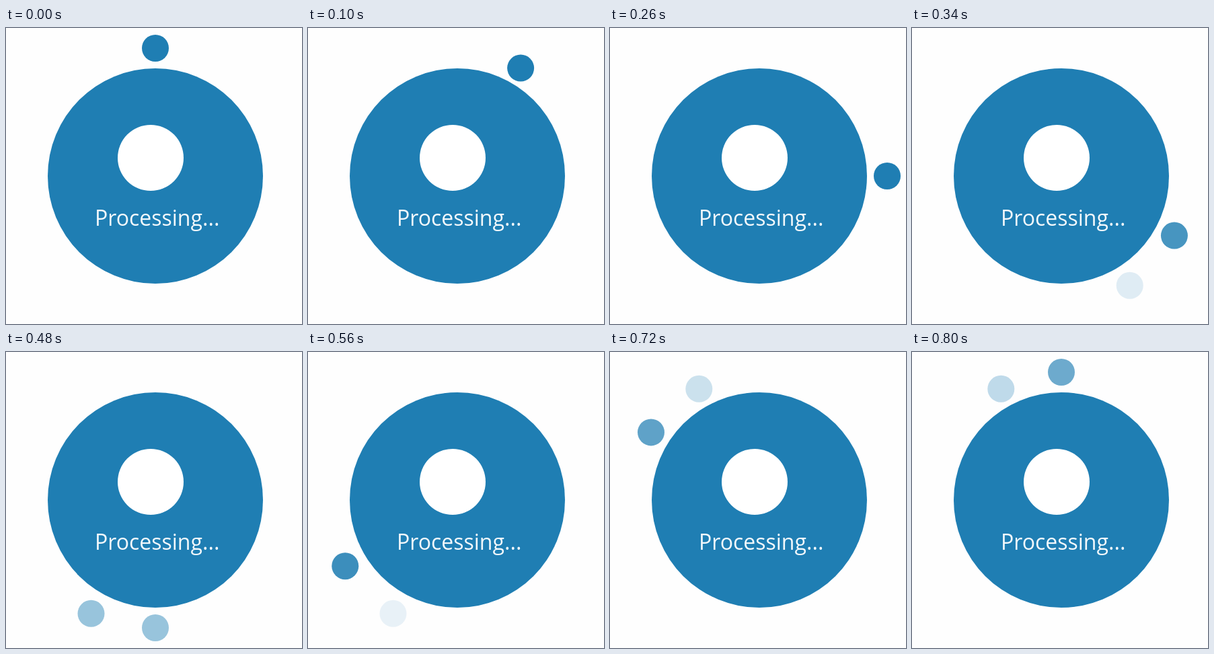
An HTML page for the animation above (0.82 s loop, 440 px wide and 440 px high).

```html
<!DOCTYPE html>
<html lang="en">
<head>
<meta charset="utf-8">
<title>Processing</title>
<style>
  html, body { margin: 0; width: 100%; height: 100%; overflow: hidden; background: #fefefe; }
  svg { display: block; width: 440px; height: 440px; }
  text { font: 32px "Open Sans", "Noto Sans", sans-serif; fill: #f4f9fc; }
</style>
</head>
<body>
<svg viewBox="0 0 440 440">
  <g id="dots" fill="#1f7eb3"></g>
  <circle cx="222" cy="220" r="160" fill="#1f7eb3"/>
  <circle cx="215" cy="193" r="49" fill="#fff"/>
  <text x="132" y="294">Processing...</text>
</svg>
<script>
const LOOP = 820, STEP = 20;
const CX = 222, CY = 220, RING = 190;

// Uneven clock bearings of the dots, in degrees
const bearings = [0, 30.4, 60.7, 90, 117.8, 148, 180, 209.5, 239.5, 267, 302, 331.5];

const group = document.getElementById("dots");
const dots = bearings.map(deg => {
  const a = deg * Math.PI / 180;
  // The ring bulges slightly towards the lower left
  const r = RING - 4.6 * Math.cos(a - Math.PI / 6) * Math.abs(Math.sin(2 * a));
  const dot = document.createElementNS("http://www.w3.org/2000/svg", "circle");
  dot.setAttribute("cx", CX + r * Math.sin(a));
  dot.setAttribute("cy", CY - r * Math.cos(a));
  dot.setAttribute("r", 20);
  return group.appendChild(dot);
});

// Dots travelled: a slower start, then a steady pace
const travelled = t => Math.max(0.01 * t, 0.016 * t - 1.18);

// Opacity of a dot, by its distance from the current position
function glow(d) {
  if (d >= 1) return 0;
  const dip = 0.04 * Math.sin(Math.PI * d) ** 2;
  return Math.max(0, 0.5 + 0.5 * Math.cos(Math.PI * d) - dip);
}

function draw(ms) {
  const t = Math.floor((ms % LOOP) / STEP) * STEP;
  const pos = travelled(t), n = dots.length;
  dots.forEach((dot, i) => {
    const gap = Math.abs(pos - i);
    dot.setAttribute("opacity", glow(Math.min(gap, n - gap)).toFixed(3));
  });
}

function tick() {
  draw(performance.now());
  requestAnimationFrame(tick);
}
tick();
</script>
</body>
</html>
```
